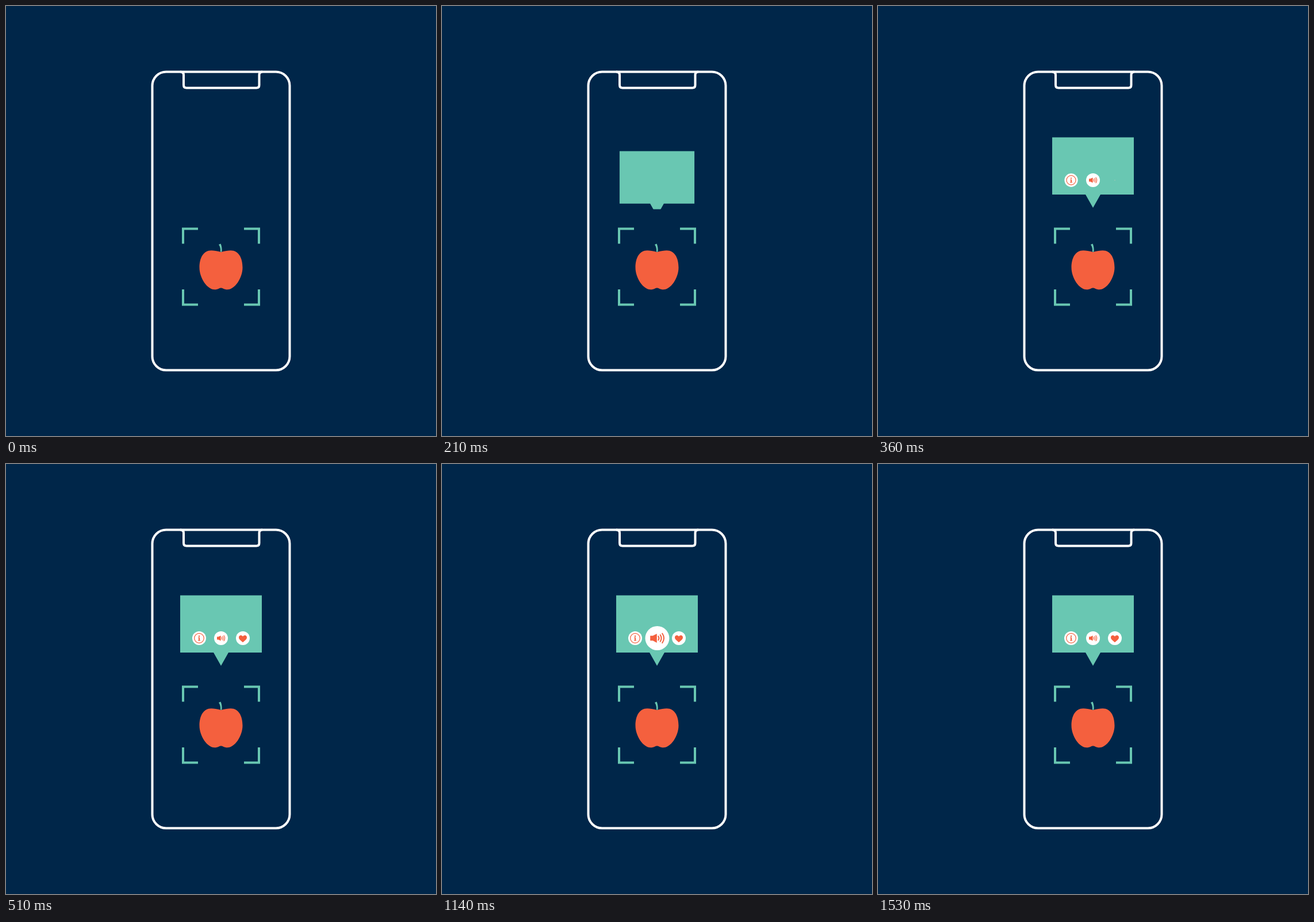
Recreate the animation shown at these times as an HTML page. Size 748 by 748 pixels, loop 3.3 s.

```html
<!DOCTYPE html>
<html lang="en">
<head>
<meta charset="utf-8">
<title>Phone scanner</title>
<style>
  :root { --navy: #002649; --teal: #69c7b2; --coral: #f4603e; }
  html, body { margin: 0; width: 100%; height: 100%; overflow: hidden; background: var(--navy); }
  svg { display: block; width: 100vw; height: 100vh; }
  .line { fill: none; stroke: #fff; stroke-width: 4; }
  .corners { fill: none; stroke: var(--teal); stroke-width: 4; }
  .teal { fill: var(--teal); }
  .coral { fill: var(--coral); }
  .ring { fill: none; stroke: var(--coral); stroke-width: 1.2; }
  .waves { fill: none; stroke: var(--coral); stroke-width: 1.15; stroke-linecap: round; }
</style>
</head>
<body>
<svg viewBox="0 0 748 748">
  <clipPath id="window"><rect x="253" y="200" width="242" height="153.5"/></clipPath>

  <g class="line">
    <rect x="254.5" y="114.5" width="239" height="519" rx="24"/>
    <path d="M303 114.5Q309 114.5 309 120V137.5Q309 142.5 314 142.5H435.5Q440.5 142.5 440.5 137.5V120Q440.5 114.5 446 114.5"/>
  </g>

  <path class="corners" d="M334 387.5H308V413.5M414 387.5H440V413.5M334 519.5H308V493M414 519.5H440V493"/>

  <path class="coral" d="M374 428C381 426 386 425.2 391 425.2C404.500 425.2 411.500 438 411.500 455C411.500 473 398 493.300 385 493.300C379 493.300 378 490.500 374 490.500C370 490.500 369 493.300 363 493.300C350 493.300 336.500 473 336.500 455C336.500 438 343.500 425.2 357 425.2C362 425.2 367 426 374 428Z"/>
  <path class="teal" d="M370 415L373.500 413.500C375.500 418 376 423 375.400 427.800L372.800 427.500C373.500 423 372.500 418.500 370 415Z"/>

  <g clip-path="url(#window)">
    <path id="bubble" class="teal" d="M303 228.500H445V328H387L374 351L361 328H303Z"/>
  </g>

  <g id="info">
    <circle r="12" fill="#fff"/>
    <circle class="ring" r="8.3"/>
    <path class="coral" d="M-1.700 -1.400H1V3.200H1.900V4.400H-1.900V3.200H-0.900V-0.200H-1.700Z"/>
    <circle class="coral" cy="-3.500" r="1.200"/>
  </g>
  <g id="heart">
    <circle r="12" fill="#fff"/>
    <path class="coral" d="M0 -3C-1.400 -5.700 -7 -6.200 -7 -1.200C-7 2.200 -2.800 4.700 0 7.200C2.800 4.700 7 2.200 7 -1.200C7 -6.200 1.400 -5.700 0 -3Z"/>
  </g>
  <g id="sound">
    <circle r="12" fill="#fff"/>
    <path class="coral" d="M-7 -2.400H-4.400L-0.400 -4.500V4.500L-4.400 2.400H-7Z"/>
    <path class="waves" d="M1.100 -1.900Q2.300 0 1.100 1.900M3 -3.300Q5.200 0 3 3.300M5 -4.700Q8.200 0 5 4.700"/>
  </g>
</svg>
<script>
  const LOOP = 3300, STEP = 30;
  const POP = [0.04, 0.55, 1, 1.08, 0.97, 1];
  const $ = id => document.getElementById(id);
  const bubble = $('bubble'), info = $('info'), sound = $('sound'), heart = $('heart');

  const ramp = (t, from, to) => Math.min(1, Math.max(0, (t - from) / (to - from)));
  const pop = (t, start) => t < start ? 0 : POP[Math.min(POP.length - 1, (t - start) / STEP)];

  function place(el, x, y, scale) {
    el.setAttribute('visibility', scale > 0 ? 'visible' : 'hidden');
    el.setAttribute('transform', `translate(${x} ${y}) scale(${scale})`);
  }

  // The bubble rises from behind a hidden edge while growing around its centre.
  function raise(t) {
    const left = (1 - ramp(t, 120, 320)) ** 3;
    const scale = 1 - left / 2;
    bubble.setAttribute('transform',
      `translate(374 ${289.5 + 114 * left}) scale(${scale}) translate(-374 -289.5)`);
  }

  function draw(now) {
    // Poses hold for 30 ms each.
    const t = Math.floor((now % LOOP) / STEP) * STEP;
    const pulse = 1 + 0.75 * (ramp(t, 1020, 1140) - ramp(t, 1410, 1530));
    raise(t);
    place(info, 336, 303, pop(t, 240));
    place(sound, 374 + 0.6 * (pulse - 1), 303, pop(t, 300) * pulse);
    place(heart, 412, 303, pop(t, 360));
  }

  const start = performance.now();
  function tick() {
    draw(performance.now() - start);
    requestAnimationFrame(tick);
  }
  tick();
</script>
</body>
</html>
```
